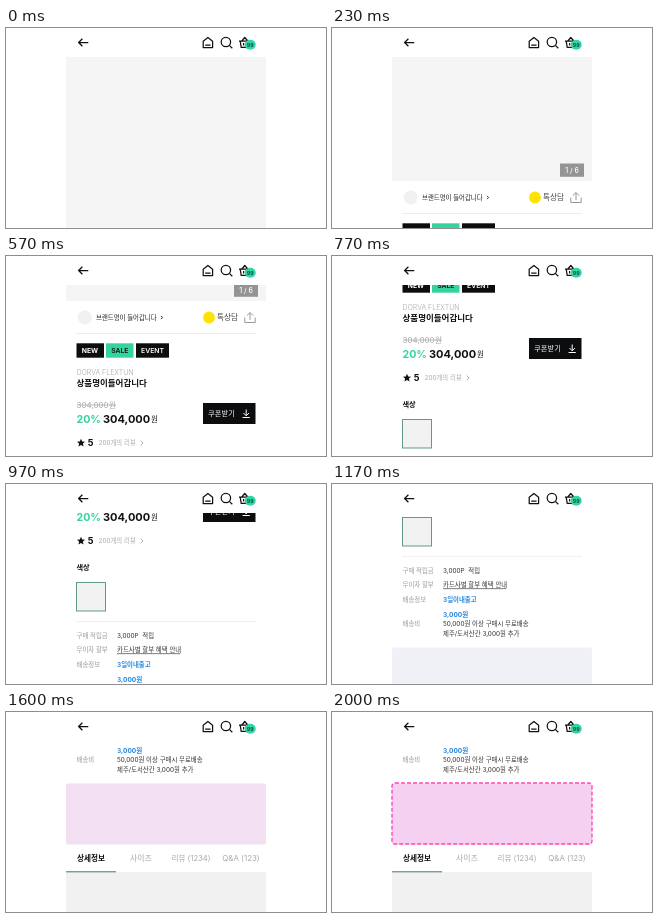
Write an HTML page that moves like this. It is 320 px wide and 200 px high and loops after 2060 ms.

```html
<!DOCTYPE html>
<html lang="ko">
<head>
<meta charset="utf-8">
<style>
  html, body { margin: 0; width: 100%; height: 100%; overflow: hidden; background: #fff; }
  svg { display: block; width: 100vw; height: 100vh; }
  text { font-family: Inter, "Noto Sans CJK KR", "Noto Sans CJK", sans-serif; white-space: pre; }
  .line { fill: none; stroke: #111; stroke-width: 1.25; stroke-linejoin: round; }
</style>
</head>
<body>
<svg viewBox="0 0 320 200">
  <g id="page">
    <rect x="60" y="29" width="200" height="200" fill="#f5f5f5"/>
    <rect x="228" y="211.5" width="24" height="13.3" fill="#949494"/>

    <!-- brand row -->
    <circle cx="78.8" cy="245.5" r="7" fill="#f1f1f1"/>
    <path class="line" d="M155 243.9l1.6 1.6-1.6 1.6" style="stroke-width:.9"/>
    <circle cx="203" cy="245.5" r="5.9" fill="#ffe300"/>
    <path class="line" d="M238.8 245.5v5h10.4v-5M244 248v-7.3M240.8 243.7l3.2-3.2 3.2 3.2" style="stroke:#999;stroke-width:1"/>
    <rect x="70" y="261" width="180" height="1" fill="#ededed"/>

    <!-- tags -->
    <rect x="70.5" y="271.3" width="27.5" height="14.4" fill="#0b0d0f"/>
    <rect x="100" y="271.3" width="27.5" height="14.4" fill="#35d49c"/>
    <rect x="130" y="271.3" width="33" height="14.4" fill="#0b0d0f"/>

    <!-- price, coupon and rating -->
    <rect x="71" y="332.6" width="39" height=".8" fill="#aaa"/>
    <rect x="197" y="331" width="52.5" height="21" fill="#0b0d0f"/>
    <path class="line" d="M240.2 337.5v6M237.4 341l2.8 2.8 2.8-2.8M236.6 345.5h7.2" style="stroke:#fff;stroke-width:1"/>
    <path id="star" fill="#111"/>
    <path class="line" d="M134.8 368.6l2.2 2.3-2.2 2.3" style="stroke:#999;stroke-width:.8"/>

    <!-- colour swatch -->
    <rect x="70.5" y="412.5" width="29" height="28.5" fill="#f2f2f2" stroke="#63998a"/>
    <rect x="70" y="451" width="180" height="1" fill="#f0f0f0"/>
    <rect x="111" y="483.4" width="63" height=".7" fill="#444"/>

    <!-- banner -->
    <rect x="60" y="542.5" width="200" height="61" rx="2" fill="#f0f1f6"/>
    <rect id="tint" x="60" y="542.5" width="200" height="61" rx="2" fill="#f5d0f0"/>
    <rect id="dash" x="60" y="542" width="200" height="61" rx="3" fill="none" stroke="#fb4bb5" stroke-width="1.4" stroke-dasharray="4 2"/>

    <!-- tabs -->
    <rect x="60" y="631" width="200" height="60" fill="#f1f1f1"/>
    <rect x="60" y="630.3" width="50" height="1" fill="#437868"/>
  </g>

  <g id="header">
    <rect width="320" height="29" fill="#fff"/>
    <g class="line">
      <path d="M82.3 14.5H72.8M76.4 10.7l-3.8 3.8 3.8 3.8"/>
      <path d="M197.2 19.5v-6.3l4.7-3.7 4.7 3.7v6.3zM199.2 17.1h5.4"/>
      <circle cx="219.9" cy="14" r="4.7"/>
      <path d="M223.3 17.4l3 2.8"/>
      <path d="M233 13.2h11.4M234.2 13.2l1 6.2h7.2l1-6.2M235.8 13l3-3.5 3 3.5M237.6 15v2.4M240 15v2.4"/>
    </g>
    <ellipse cx="244.2" cy="16.8" rx="5.5" ry="5" fill="#2fd6a0"/>
  </g>
</svg>
<script>
const $ = id => document.getElementById(id);
const page = $("page"), header = $("header");

// y is the vertical middle of the text
function label(text, x, y, size, fill = "#222", weight = 400, anchor = "start", parent = page) {
  const el = document.createElementNS("http://www.w3.org/2000/svg", "text");
  const attrs = { x, y: y + size * .36, "font-size": size, fill, "font-weight": weight, "text-anchor": anchor };
  for (const key in attrs) el.setAttribute(key, attrs[key]);
  el.textContent = text;
  parent.append(el);
}

const grey = "#a8a8a8", blue = "#2488e0", black = "#111";

label("99", 244.2, 16.8, 5.4, "#124", 500, "middle", header);

label("1 / 6", 240, 218, 7, "#fff", 500, "middle");
label("브랜드명이 들어갑니다", 90, 245.5, 6.4, "#222");
label("톡상담", 211, 245.5, 7.6, "#444");
label("NEW", 84, 278.5, 6.8, "#fff", 700, "middle");
label("SALE", 113.8, 278.5, 6.8, black, 600, "middle");
label("EVENT", 146.5, 278.5, 6.8, "#fff", 600, "middle");
label("DORVA FLEXTUN", 70.5, 300, 7, grey, 300);
label("상품명이들어갑니다", 70.5, 311.2, 8.5, black, 700);

label("304,000원", 70.5, 333, 8, grey);
label("20%", 70.5, 347, 10.6, "#35d49c", 700);
label("304,000", 97, 347, 11, black, 700);
label("원", 145, 347, 7.5, black);
label("쿠폰받기", 202, 341.3, 7.3, "#fff");
label("5", 81.8, 371, 9.2, black, 700);
label("200개의 리뷰", 92.5, 371, 6.4, grey);
label("색상", 70.5, 397, 7.2, black, 700);

[["구매 적립금", 465.5], ["무이자 할부", 480], ["배송정보", 494.5], ["배송비", 519]]
  .forEach(([text, y]) => label(text, 70.5, y, 6.4, "#999"));
[["3,000P  적립", 465.5], ["카드사별 할부 혜택 안내", 480],
 ["50,000원 이상 구매시 무료배송", 519], ["제주/도서산간 3,000원 추가", 528.7]]
  .forEach(([text, y]) => label(text, 111, y, 6.4, "#333"));
label("3일이내출고", 111, 494.5, 6.4, blue, 700);
label("3,000원", 111, 509.2, 6.5, blue, 700);

label("상세정보", 85, 617.3, 7.6, black, 700, "middle");
label("사이즈", 135, 617.5, 7.9, grey, 400, "middle");
label("리뷰 (1234)", 185, 617.5, 7.6, grey, 400, "middle");
label("Q&A (123)", 235, 617.5, 7.9, grey, 400, "middle");

const points = Array.from({ length: 10 }, (_, i) => {
  const a = i * Math.PI / 5, r = i % 2 ? 2 : 4.3;
  return [75 + r * Math.sin(a), 371 - r * Math.cos(a)];
});
$("star").setAttribute("d", `M${points.join("L")}z`);

const LOOP = 2060, END = 471;
const ramp = (t, from, to) => Math.min(1, Math.max(0, (t - from) / (to - from)));

function draw(now) {
  const step = Math.floor(now % LOOP * .03 + .12); // 30 steps per second
  const t = step * 100 / 3;
  const scroll = Math.min(END, Math.round(step * 65 / 6));
  const strong = ramp(t, 1667, 2000);
  page.setAttribute("transform", `translate(0 ${-scroll})`);
  $("tint").setAttribute("opacity", ramp(t, 1450, 1600) / 2 + strong / 2);
  $("dash").setAttribute("opacity", strong);
}

let start;
function tick(now) {
  start ??= now;
  draw(now - start);
  requestAnimationFrame(tick);
}
draw(0);
requestAnimationFrame(tick);
</script>
</body>
</html>
```
